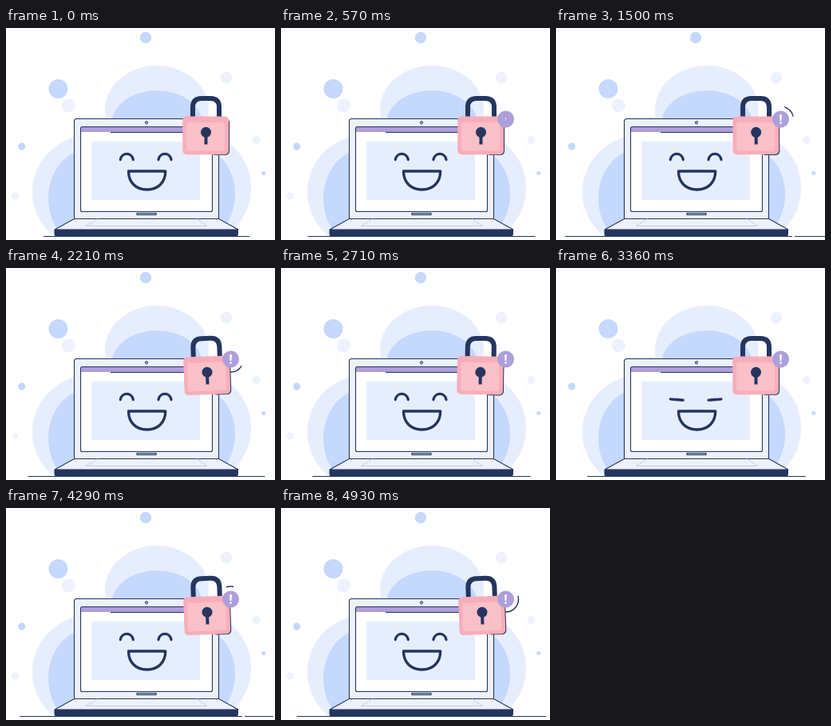
An HTML page that plays this animation: 337 by 265 pixels, repeating every 5 s.

```html
<!DOCTYPE html>
<html lang="en">
<head>
<meta charset="utf-8">
<title>Happy laptop with padlock</title>
<style>
  html, body { margin: 0; width: 100%; height: 100%; overflow: hidden; background: #fff; }
  svg { display: block; width: 100%; height: 100%; }
  .line { fill: none; stroke: #24365f; stroke-linejoin: round; }
  .round { stroke-linecap: round; }
  .edge { stroke: #24365f; stroke-width: 1.1; }
  .navy { fill: #24365f; }
  .blue { fill: #c5d8fd; }
  .pale { fill: #e6eefe; }
  .faint { fill: #eef2fe; }
  .body { fill: #edf1fb; }
  .violet { fill: #ad9fdb; }
</style>
</head>
<body>
<svg viewBox="0 0 337 265">
  <clipPath id="above"><rect width="337" height="260"/></clipPath>
  <g clip-path="url(#above)">
    <g class="pale">
      <ellipse cx="189" cy="102" rx="65" ry="55"/>
      <ellipse cx="108" cy="205" rx="75" ry="72"/>
      <ellipse cx="235" cy="200" rx="72" ry="72"/>
    </g>
    <g class="blue">
      <ellipse cx="189" cy="120" rx="57" ry="42"/>
      <ellipse cx="105" cy="213" rx="52" ry="62"/>
      <ellipse cx="237" cy="208" rx="50" ry="60"/>
    </g>
  </g>

  <g class="blue">
    <circle id="topDot" cx="175" cy="12"/>
    <circle cx="65.500" cy="76" r="12"/>
    <circle cx="19.700" cy="148" r="4.500"/>
    <circle cx="322.700" cy="181.500" r="2.500"/>
  </g>
  <g class="faint">
    <circle cx="78.500" cy="97" r="8.500"/>
    <circle cx="276" cy="62" r="7.500"/>
    <circle cx="313.500" cy="140" r="5"/>
    <circle id="leftDot" cx="11.500" cy="210"/>
  </g>

  <path id="ground" class="line"/>

  <g id="laptop">
    <rect class="edge body" x="85.500" y="113.500" width="181" height="127" rx="3"/>
    <rect fill="#fff" x="93.500" y="124" width="165" height="105" rx="2"/>
    <path class="violet" d="M94 124H258V130H94Z"/>
    <path class="line" d="M131 130.500H258"/>
    <rect class="edge" fill="none" x="93.500" y="123.500" width="165" height="106" rx="2"/>
    <rect class="pale" x="107" y="142" width="136" height="73"/>
    <circle class="edge" fill="#fff" cx="176" cy="118.300" r="1.400"/>
    <rect class="edge" fill="#c9cfe6" x="164" y="231.500" width="24" height="2"/>
    <path class="edge body" d="M85.500 238.500H266.500L291 252H61Z"/>
    <path fill="none" stroke="#c9cee8" d="M115 238.500L100 247.500H252L239 238.500"/>
    <path class="navy" d="M60.500 252H291V257Q291 261 287 261H65Q60.500 261 60.500 257Z"/>
  </g>

  <path id="eyes" class="line round" stroke-width="3.300"/>
  <path class="line" stroke-width="3.400" d="M153.500 179H199.700C199.700 193 190.500 202 176.600 202S153.500 193 153.500 179Z"/>

  <g id="lock">
    <path class="line" stroke-width="6" d="M234 112V99Q234 88 245 88H256Q267 88 267 99V112"/>
    <rect class="navy" x="257" y="113" width="23" height="46" rx="5"/>
    <rect fill="#f8adba" x="221.300" y="110.500" width="57.700" height="47.700" rx="5"/>
    <rect fill="#f9c0c8" x="226" y="118" width="48" height="35.500" rx="3"/>
    <circle class="navy" cx="250.500" cy="130.300" r="6.500"/>
    <path class="line" stroke-width="4" d="M250.500 132V145.500"/>
  </g>

  <path id="ring" class="line round" stroke-width="1.400"/>
  <g id="badge">
    <circle class="violet" r="10.500"/>
    <g id="mark" fill="#fff">
      <path d="M-1.500 -5.700H1.500L0.900 2H-0.900Z"/>
      <circle cy="4.600" r="1.300"/>
    </g>
  </g>
</svg>
<script>
const LOOP = 5000;
const CYCLE = 3035; // ground, lock and ring repeat within the loop
const BADGE = { x: 281.5, y: 114 };
const set = (id, name, value) => document.getElementById(id).setAttribute(name, value);
const clamp = (v, lo, hi) => Math.min(hi, Math.max(lo, v));
const ramp = (t, from, to) => clamp((t - from) / (to - from), 0, 1);
// Falls from 1 to 0 around a moment and comes back.
const dip = (t, middle, hold, fade) => ramp(Math.abs(t - middle), hold, hold + fade);

// The ground line spreads out and back evenly on both sides.
function groundPath(phase) {
  const spread = 1 - Math.abs(phase - CYCLE / 2) / (CYCLE / 2);
  const left = 47 - 36 * spread;
  const gap = spread > 0.8 ? "H296M299 260.5" : "";
  return `M${left} 260.5${gap}H${352 - left}`;
}

function ringPath(phase) {
  const age = phase - 1149;
  const sweep = (speed, delay) => clamp(speed * (age - delay) - 108, -108, 90);
  const head = sweep(0.266, 0);
  const tail = sweep(0.148, 106);
  if (head <= tail) return "";
  const point = deg => {
    const a = deg * Math.PI / 180;
    return `${BADGE.x + 16 * Math.cos(a)} ${BADGE.y + 16 * Math.sin(a)}`;
  };
  return `M${point(tail)}A16 16 0 0 1 ${point(head)}`;
}

// Open eyes are arches; closed eyes are lines sloping inward.
function eyesPath(open) {
  const arch = 9.5 * open;
  const slope = 0.7 * (1 - open);
  const eye = (x, tilt) => {
    const y1 = 164.5 - tilt, y2 = 164.5 + tilt;
    return `M${x} ${y1}C${x + 1.5} ${y1 - arch} ${x + 14.5} ${y2 - arch} ${x + 16} ${y2}`;
  };
  return eye(143.3, slope) + eye(191, -slope);
}

function lockAngle(phase) {
  const swing = 2 * ramp(phase, 1095, 1255) * (1 - ramp(phase, 2500, 2900));
  return -swing * Math.cos((phase - 1255) / 320 * 2 * Math.PI);
}

function draw() {
  const t = performance.now() % LOOP;
  const phase = t % CYCLE;
  set("topDot", "r", 7.2 * dip(t, 3365, 100, 350));
  set("leftDot", "r", 4.5 * dip(t, 1470, 320, 500) * dip(t, 3400, 100, 400));
  set("ground", "d", groundPath(phase));
  set("eyes", "d", eyesPath(dip(t, 3360, 60, 100)));
  set("lock", "transform", `rotate(${lockAngle(phase)} 250.5 88)`);
  set("ring", "d", ringPath(phase));
  set("badge", "transform", `translate(${BADGE.x} ${BADGE.y}) scale(${ramp(t, 200, 500)})`);
  set("mark", "transform", `scale(${ramp(t, 450, 800)})`);
  requestAnimationFrame(draw);
}
draw();
</script>
</body>
</html>
```
